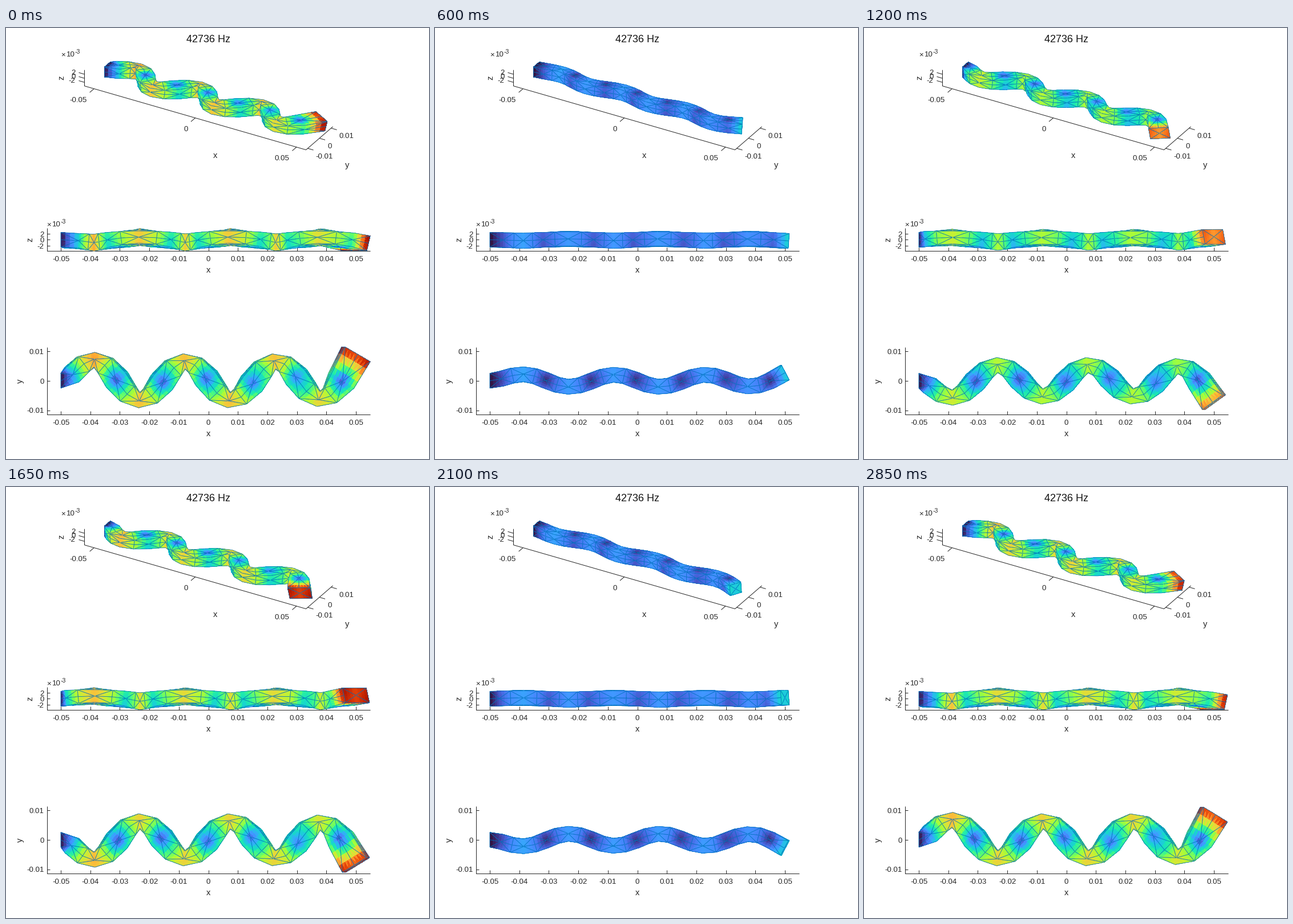
A matplotlib script that plays this animation: 741x756 px, repeating every 3 s.

```python
import numpy as np
import matplotlib
import matplotlib.pyplot as plt
from matplotlib.animation import FuncAnimation
from matplotlib.collections import PolyCollection

W, H, DPI = 741, 756, 100
FRAMES, INTERVAL = 20, 150
PT = 72 / DPI                       # points per pixel
INK = "#262626"
MESH = matplotlib.colors.to_rgb("#0072bd")

plt.rcParams["font.family"] = "Liberation Sans"
fig = plt.figure(figsize=(W / DPI, H / DPI), dpi=DPI, facecolor="white")
ax = fig.add_axes([0, 0, 1, 1])
ax.set_xlim(0, W)
ax.set_ylim(H, 0)
ax.axis("off")

# ---- beam geometry in mm: 100 long, square section of 5 ----
LENGTH, HALF = 100.0, 2.5
STATIONS = np.append(3.8 * np.arange(26), LENGTH) - 50
RING = [(-1, -1), (0, -1), (1, -1), (1, 0), (1, 1), (0, 1), (-1, 1), (-1, 0)]
EX, EY, EZ = np.eye(3)


def fan(point, spokes):
    """Eight triangles round a center, and which of their edges are drawn."""
    center = point(0, 0)
    ring = [point(a, b) for a, b in RING]
    pairs = [(i, (i + 1) % 8) for i in range(8)]
    tris = [[center, ring[i], ring[j]] for i, j in pairs]
    shown = [[i in spokes, True, j in spokes] for i, j in pairs]
    return tris, shown


def build_mesh():
    tris, shown = fan(lambda a, b: HALF * (EX * LENGTH / 5 + EY * a + EZ * b), {0, 2, 4, 6})
    for normal, across in ((EZ, EY), (EY, -EZ), (-EZ, -EY), (-EY, EZ)):
        for i in range(1, len(STATIONS), 2):
            t, s = fan(lambda a, b: EX * STATIONS[i + a] + HALF * (normal + across * b),
                       {0, 2, 3, 4, 6, 7})
            tris += t
            shown += s
    return np.array(tris), np.array(shown)


def mode_shape(p):
    """Seventh bending mode of a cantilever, tilted slightly out of plane."""
    x, y, z = p[..., 0], p[..., 1], p[..., 2]
    end = 6.5 * np.pi
    k = end / LENGTH
    s = k * (x + 50)
    c, root, tip = 6.7 / np.sqrt(2), np.exp(-s), 0.9 * np.exp(s - end)
    w = c * (np.sin(s) - np.cos(s) + root + tip)
    turn = 0.93 * c * k * (np.cos(s) + np.sin(s) - root + tip)
    bend = 0.93 * c * k * k * (np.cos(s) - np.sin(s) + root + tip)
    tilt = 0.135
    squeeze = 0.25 * bend * np.minimum(s, 1)
    return np.stack([turn * (tilt * z - y),
                     w + squeeze * (y * y - z * z) / 2,
                     squeeze * y * z - tilt * w], axis=-1)


def sub_triangles(n):
    """Barycentric corners of the n*n parts of a triangle."""
    def corner(i, j):
        return [(n - i - j) / n, i / n, j / n]
    parts = []
    for i in range(n):
        for j in range(n - i):
            parts.append([corner(i, j), corner(i + 1, j), corner(i, j + 1)])
            if i + j < n - 1:
                parts.append([corner(i + 1, j), corner(i + 1, j + 1), corner(i, j + 1)])
    return np.array(parts)


TRIS, SHOWN = build_mesh()
SHIFT = mode_shape(TRIS)
SIZE = np.linalg.norm(SHIFT, axis=-1)
SIZE /= SIZE.max()
PARTS = sub_triangles(4)
N_FILL = len(PARTS)
EDGES = [[0, 1, 1], [1, 2, 2], [2, 0, 0]]
TURBO = matplotlib.colormaps["turbo"]

# ---- views: screen matrix, screen offset, direction to the camera ----
S3 = 4.096
SIN, COS = 0.5, np.sqrt(3) / 2
M3 = S3 * np.array([[COS, SIN, 0], [SIN * SIN, -COS * SIN, -COS]])
S2 = 5.17
XLIM, YLIM, ZLIM = 54.7, 11.45, -3.8
VIEWS = [
    (M3, np.array([137.5, 101.7]) - M3 @ [-XLIM, -YLIM, ZLIM],
     np.array([SIN * COS, -COS * COS, SIN])),
    (np.array([[S2, 0, 0], [0, 0, -S2]]), np.array([354.5, 371.4]), -EY),
    (np.array([[S2, 0, 0], [0, -S2, 0]]), np.array([354.5, 618.8]), EZ),
]


def to_screen(view, p):
    matrix, offset, _ = VIEWS[view]
    return np.asarray(p) @ matrix.T + offset


# ---- axes and labels ----
def line(*pts):
    xs, ys = zip(*pts)
    ax.plot(xs, ys, color=INK, lw=PT, solid_capstyle="butt", zorder=1)


def label(x, y, s, size=13.3, ha="center", drop=0.36, color=INK):
    """Text whose digits are centered on height y."""
    ax.text(x, y + drop * size, s, fontsize=size * PT, ha=ha, va="baseline", color=color)


def side_label(x, y, s):
    ax.text(x + 3.5, y, s, fontsize=14.6 * PT, ha="center", va="baseline",
            rotation=90, rotation_mode="anchor", color=INK)


def exponent(x, y):
    label(x, y, "×", ha="left")
    label(x + 9, y, "10", ha="left")
    label(x + 24, y - 4.5, "-3", 10.6, "left")


def flat_axes(view, top, bottom, ticks, names):
    left, right = 71.5, 637.5
    line((left, top), (left, bottom), (right, bottom))
    for i in range(-5, 6):
        x = to_screen(view, [10 * i, 0, 0])[0]
        line((x, bottom), (x, bottom - 5.5))
        label(x, bottom + 14, f"{i / 100:g}")
    for p, name in zip(ticks, names):
        y = to_screen(view, p)[1]
        line((left, y), (left + 5.5, y))
        label(66.5, y, name, ha="right")
    label(354.5, bottom + 34.5, "x", 14.6, drop=0.26)


label(354.5, 18.5, "42736 Hz", 18, color="#111111")

corners = [(-XLIM, -YLIM, 4.1), (-XLIM, -YLIM, ZLIM), (XLIM, -YLIM, ZLIM), (XLIM, YLIM, ZLIM)]
line(*[to_screen(0, c) for c in corners])
for v in (-50, 0, 50):
    x, y = to_screen(0, [v, -YLIM, ZLIM])
    line((x, y), (x - 7.5, y + 6.5))
    label(x - 12.5, y + 18.7, f"{v / 1000:g}", ha="right")
for v in (-10, 0, 10):
    x, y = to_screen(0, [XLIM, v, ZLIM])
    line((x, y), (x + 10, y + 2.9))
    label(x + 14, y + 12.7, f"{v / 1000:g}", ha="left")
for v in (-2, 0, 2):
    x, y = to_screen(0, [-XLIM, -YLIM, v])
    line((x, y), (x - 10, y - 2.9))
    label(x - 16, y - 4, f"{v}", ha="right")
exponent(96.5, 45.5)
label(366.5, 224, "x", 14.6, drop=0.26)
label(598, 241, "y", 14.6, drop=0.26)
side_label(97.5, 87, "z")

flat_axes(1, 351, 390.5, [EZ * v for v in (-2, 0, 2)], ["-2", "0", "2"])
exponent(71.5, 343.5)
side_label(42.5, 371.5, "z")

flat_axes(2, 560, 677.5, [EY * v for v in (-10, 0, 10)], ["-0.01", "0", "0.01"])
side_label(25, 619, "y")

# ---- moving beam: each triangle is its shaded parts followed by three edges ----
beams = []
for _ in VIEWS:
    beam = PolyCollection(np.zeros((1, 3, 2)), joinstyle="round",
                          linewidths=[0] * N_FILL + [0.8 * PT] * 3,
                          antialiaseds=[False] * N_FILL + [True] * 3, zorder=2)
    beam.set_snap(False)
    ax.add_collection(beam, autolim=False)
    beams.append(beam)


def update(frame):
    amp = np.cos(2 * np.pi * frame / FRAMES)
    pos = TRIS + amp * SHIFT
    normal = np.cross(pos[:, 1] - pos[:, 0], pos[:, 2] - pos[:, 0])
    for view, beam in enumerate(beams):
        camera = VIEWS[view][2]
        seen = np.flatnonzero(normal @ camera > 0)
        order = seen[np.argsort(pos[seen].mean(axis=1) @ camera)]
        flat = to_screen(view, pos[order])
        fills = np.einsum("pck,ekd->epcd", PARTS, flat)
        verts = np.concatenate([fills, flat[:, EDGES]], axis=1)
        value = abs(amp) * SIZE[order] @ PARTS.mean(axis=1).T
        faces = np.zeros((len(order), N_FILL + 3, 4))
        faces[:, :N_FILL] = TURBO(value)
        strokes = np.zeros_like(faces)
        strokes[..., :3] = MESH
        strokes[:, N_FILL:, 3] = SHOWN[order]
        beam.set_verts(verts.reshape(-1, 3, 2))
        beam.set_facecolor(faces.reshape(-1, 4))
        beam.set_edgecolor(strokes.reshape(-1, 4))
    return beams


anim = FuncAnimation(fig, update, frames=FRAMES, interval=INTERVAL, repeat=True, repeat_delay=0)
plt.show()
```
